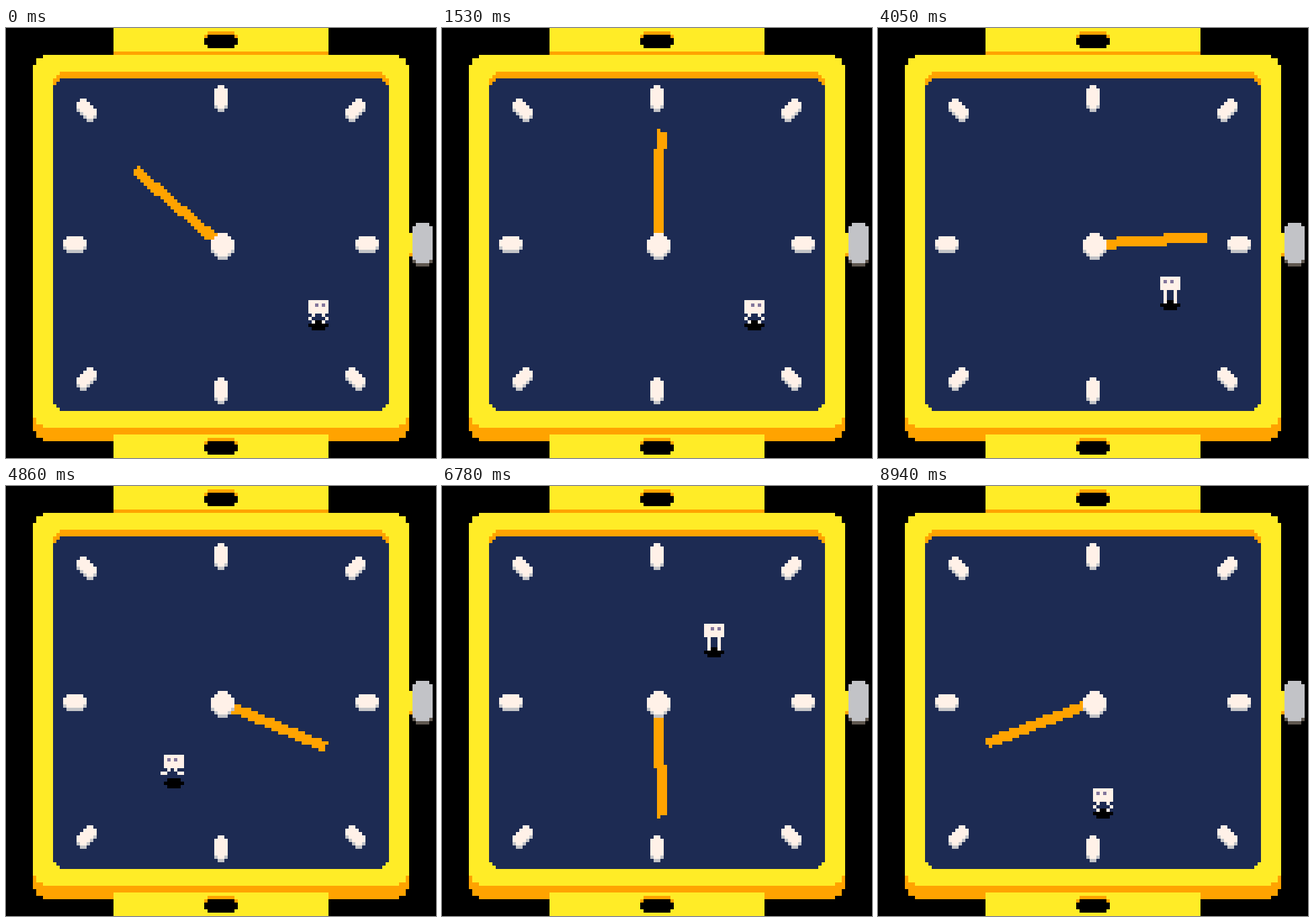
An HTML page with a canvas that plays this animation: 640 by 640 pixels, repeating every 8970 ms.

```html
<!DOCTYPE html>
<html lang="en">
<head>
<meta charset="utf-8">
<title>Watch</title>
<style>
  html, body { margin: 0; width: 100%; height: 100%; overflow: hidden; background: #000; }
  canvas { display: block; width: 100vw; height: 100vh; image-rendering: pixelated; }
</style>
</head>
<body>
<canvas id="stage" width="128" height="128"></canvas>
<script>
const ctx = document.getElementById('stage').getContext('2d');
const YELLOW = '#ffec27', ORANGE = '#ffa300', NAVY = '#1d2b53', WHITE = '#fff1e8',
      GREY = '#c2c3c7', BROWN = '#5f574f', PURPLE = '#83769c', BLACK = '#000';
const FRAME_MS = 30, FRAMES = 299;

function box(color, x, y, w = 1, h = 1) {
  ctx.fillStyle = color;
  ctx.fillRect(x, y, w, h);
}

// Rectangle whose outer rows are inset by the given corner steps.
function rounded(color, x, y, w, h, steps) {
  for (let row = 0; row < h; row++) {
    const inset = steps[Math.min(row, h - 1 - row)] || 0;
    box(color, x + inset, y + row, w - 2 * inset, 1);
  }
}

// A shape with a copy of itself one pixel lower as its shade.
function raised(shape, top, shade, x, y, ...rest) {
  shape(shade, x, y + 1, ...rest);
  shape(top, x, y, ...rest);
}

function slanted(color, x, y, flip) {
  const rows = [[1, 2], [0, 4], [0, 5], [1, 5], [2, 4], [3, 2]];
  rows.forEach(([start, w], i) => box(color, x + (flip ? 6 - start - w : start), y + i, w));
}

function strap(y) {
  box(YELLOW, 32, y, 64, 7);
  rounded(ORANGE, 59, y + 1, 10, 4, [1]);
  rounded(BLACK, 59, y + 2, 10, 4, [1]);
}

function drawWatch() {
  box(BLACK, 0, 0, 128, 128);
  rounded(ORANGE, 8, 12, 112, 111, [3, 1, 1]);
  rounded(YELLOW, 8, 8, 112, 111, [3, 1, 1]);
  strap(0);
  box(ORANGE, 32, 7, 64, 1);
  strap(121);
  rounded(ORANGE, 14, 13, 100, 98, [2, 1]);
  rounded(NAVY, 14, 15, 100, 99, [2, 1]);

  box(YELLOW, 120, 61, 1, 6);
  box(ORANGE, 120, 67);
  raised(rounded, GREY, BROWN, 121, 58, 6, 12, [1]);

  for (const y of [17, 104]) raised(rounded, WHITE, GREY, 62, y, 4, 7, [1]);
  for (const x of [17, 104]) raised(rounded, WHITE, GREY, x, 62, 7, 4, [1]);
  for (const x of [21, 101])
    for (const y of [21, 101]) raised(slanted, WHITE, GREY, x, y, x !== y);
}

// The hand turns one degree per frame; each pixel is rotated back and tested.
function drawHand(frame) {
  const angle = (frame - 49) * Math.PI / 180;
  const cos = Math.cos(angle), sin = Math.sin(angle);
  for (let y = 28; y < 100; y++) {
    for (let x = 28; x < 100; x++) {
      const dx = x - 63.5, dy = y - 64;
      const across = dx * cos + dy * sin, along = dx * sin - dy * cos;
      if (across >= -1.505 && across < 1.5 && along >= 0 && along < 34) box(ORANGE, x, y);
    }
  }
  raised(rounded, WHITE, GREY, 61, 61, 7, 7, [2, 1]);
}

// Walks as [frame, x, y] points, joined by a smooth curve.
const WALKS = [
  [[122, 90, 80], [127, 92, 79], [132, 89, 75], [139, 76, 73], [150, 57, 77], [162, 47, 80],
   [172, 41, 75], [180, 40, 66], [190, 48, 52], [200, 65, 43], [207, 78, 41]],
  [[227, 78, 41], [233, 85, 45], [240, 91, 57], [248, 94, 71], [256, 85, 84],
   [262, 73, 89], [266, 64, 89]]
];

function curve(a, b, c, d, t) {
  return b + t / 2 * (c - a + t * (2 * a - 5 * b + 4 * c - d + t * (3 * (b - c) + d - a)));
}

function position(frame) {
  const walk = WALKS[frame < 227 ? 0 : 1], last = walk.length - 1;
  if (frame <= walk[0][0]) return { x: walk[0][1], y: walk[0][2], moving: false };
  if (frame >= walk[last][0]) return { x: walk[last][1], y: walk[last][2], moving: false };
  const i = walk.findIndex(p => p[0] > frame) - 1;
  const t = (frame - walk[i][0]) / (walk[i + 1][0] - walk[i][0]);
  const near = [i - 1, i, i + 1, i + 2].map(k => walk[Math.max(0, Math.min(last, k))]);
  const at = axis => Math.round(curve(...near.map(p => p[axis]), t));
  return { x: at(1), y: at(2), moving: true };
}

function drawWalker(frame) {
  const { x, y, moving } = position(frame);
  const left = (frame > 128 && frame < 181) || frame > 248;
  const crouch = !moving && frame % 40 < 20;
  const hop = moving && (frame >> 2) % 2 === 0;
  const head = y + (crouch ? 1 : 0);
  const part = (color, px, py, w = 1, h = 1) =>
    box(color, x + (left ? 6 - px - w : px), py, w, h);

  rounded(BLACK, x, y + 7, 6, 3, [1]);
  box(WHITE, x, head, 6, 4);
  part(PURPLE, 2, head + 1);
  part(PURPLE, 4, head + 1);
  if (hop) {
    part(WHITE, 2, y + 4);
    part(WHITE, 4, y + 4);
    part(WHITE, 0, y + 5, 2);
    part(WHITE, 5, y + 5, 2);
  } else if (crouch) {
    [1, 0, 1].forEach((inset, i) => {
      part(WHITE, inset, y + 5 + i);
      part(WHITE, 5 - inset, y + 5 + i);
    });
  } else {
    part(WHITE, 1, y + 4, 1, 4);
    part(WHITE, 4, y + 4, 1, 4);
  }
}

const start = performance.now();
function draw() {
  const frame = Math.floor(Math.max(0, performance.now() - start) / FRAME_MS) % FRAMES;
  drawWatch();
  drawHand(frame);
  drawWalker(frame);
  requestAnimationFrame(draw);
}
draw();
</script>
</body>
</html>
```
